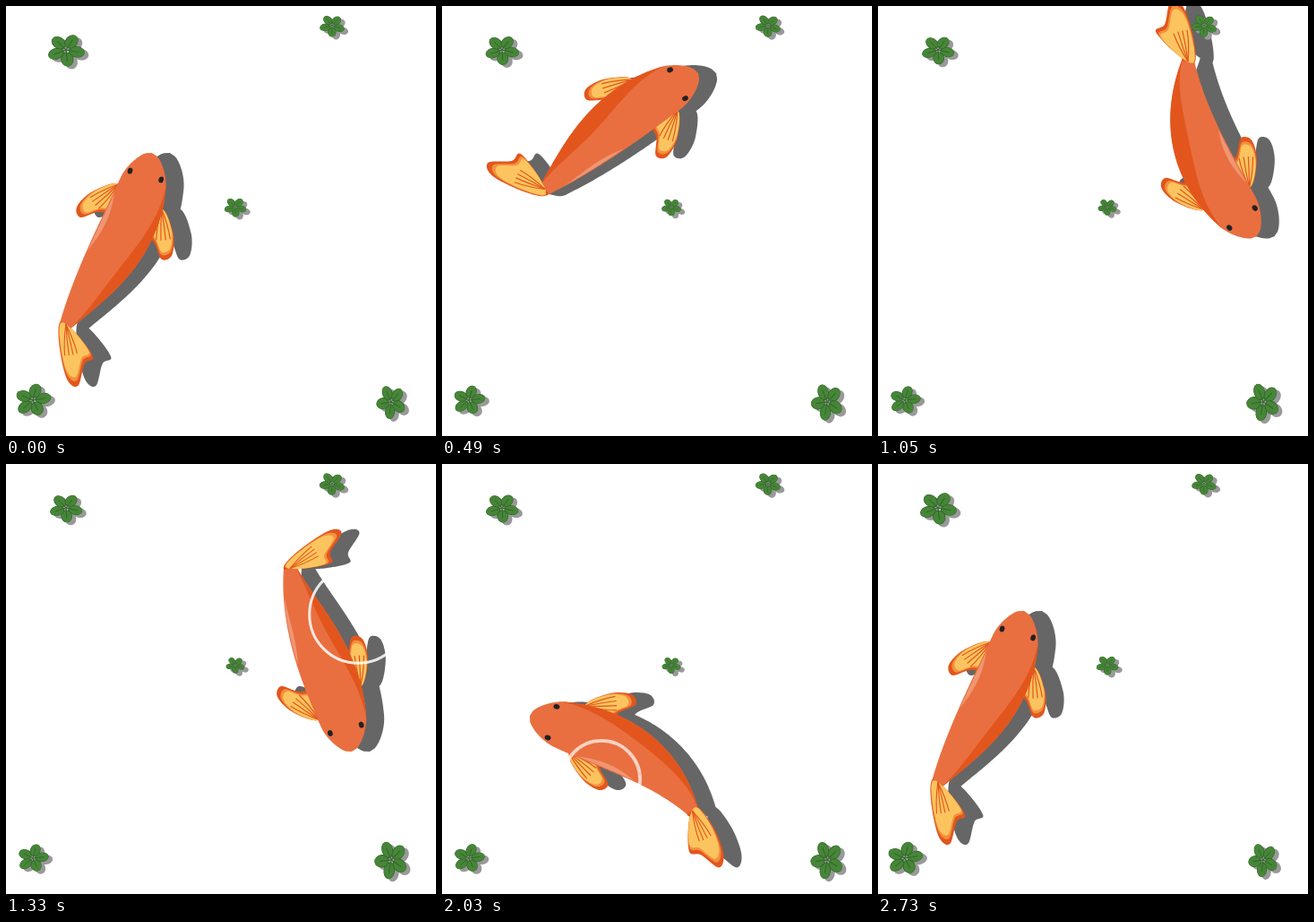
An HTML page with a canvas for the animation above (2800 ms loop, 480 by 480 pixels).

```html
<!DOCTYPE html>
<html lang="en">
<head>
<meta charset="utf-8">
<title>Koi and clovers</title>
<style>
  html, body { margin: 0; width: 100%; height: 100%; overflow: hidden; background: #fff; }
  canvas { display: block; width: 480px; height: 480px; }
</style>
</head>
<body>
<canvas id="pond" width="480" height="480"></canvas>
<script>
const ctx = document.getElementById('pond').getContext('2d');
const LOOP = 2800, STEP = 70, SWIM = 2730, WAG = SWIM / 3;
const TAU = Math.PI * 2, RAD = Math.PI / 180;
const LENGTH = 216, DS = 2, NECK = 45;
const C = {
  body: '#e96f40', dark: '#e2561d', light: '#ef9673', amber: '#f3903f',
  yellow: '#fcc45e', eye: '#222', shadow: '#666', leaf: '#478539', rim: '#2f6627'
};

// Route of the nose: time, x, y, direction from nose to tail in degrees
const ROUTE = [
  [0, 163, 164, 106], [490, 286, 75, 152], [770, 386, 178, 207], [1330, 386, 321, 255],
  [1750, 179, 403, 331], [2030, 98, 281, 376], [SWIM, 163, 164, 466]
];

// Outlines from root to tip
const FIN = [[0, 0], [28, 11], [52, 8], [56, -4], [37, -11], [20, -24]];
const TAIL = [[-3, -7], [25, -13], [60, -11], [70, 1], [47, 14], [41, 26], [10, 9]];

// x, y, start, duration, radius, rings
const DROPS = [
  [167, 95, 560, 440, 65, 3], [393, 168, 1050, 440, 57, 1], [178, 352, 1400, 600, 44, 2]
];

// x, y, width, turn, growth
const CLOVERS = [
  [67, 49, 42, 0, .88], [364, 22, 28, 8, 1.03], [256, 224.5, 25, 5, .84],
  [30, 440, 41, -20, .86], [430, 442, 38, 87, 1.12]
];

const clamp = (v, a, b) => Math.max(a, Math.min(b, v));
const mix = (a, b, u) => a + (b - a) * u;

// Smooth curve through one column of the route; both ends share a slope
function route(col, t) {
  const n = ROUTE.length - 1;
  const i = Math.max(0, ROUTE.findIndex(r => r[0] >= t) - 1);
  const span = j => ROUTE[j + 1][0] - ROUTE[j][0];
  const rate = j => (ROUTE[j + 1][col] - ROUTE[j][col]) / span(j);
  const slope = j => {
    const a = (j + n - 1) % n, b = j % n;
    return (rate(a) * span(b) + rate(b) * span(a)) / (span(a) + span(b));
  };
  const w = span(i), u = (t - ROUTE[i][0]) / w, v = 1 - u;
  return ROUTE[i][col] * v * v * (1 + 2 * u) + ROUTE[i + 1][col] * u * u * (1 + 2 * v)
    + w * u * v * (slope(i) * v - slope(i + 1) * u);
}

function girth(s) {
  const front = Math.max(0, 1 - s / 36);
  return 30.5 * Math.cos((s - 88) * .0104) * Math.sqrt(1 - front * front);
}

// A wave travels down the spine and drives fins, tail and shading
function pose(t) {
  const wave = lag => Math.cos(TAU * t / WAG - lag * RAD);
  const head = route(3, t), spine = [];
  let x = route(1, t), y = route(2, t);
  for (let s = 0; s <= LENGTH; s += DS) {
    const a = (head + Math.max(0, s - NECK) * (.03 + .22 * wave(s / 3))) * RAD;
    spine.push({ x, y, a, s });
    x += Math.cos(a) * DS;
    y += Math.sin(a) * DS;
  }
  return {
    spine,
    tail: (head + 18 + 57 * wave(141)) * RAD,
    spread: .65 + .35 * Math.abs(wave(45)),
    flip: clamp(5 * wave(-16), -1, 1),
    fins: [[1, 24.5 + 12.5 * wave(0)], [-1, 31 - 11 * wave(40)]],
    shade: .75 * wave(45) - .05,
    gloss: 125 - 35 * wave(30)
  };
}

// Positive offsets lie to the left of the heading
function beside(p, off) {
  return [p.x - Math.sin(p.a) * off, p.y + Math.cos(p.a) * off];
}

function fillPoly(points, color) {
  ctx.beginPath();
  points.forEach(p => ctx.lineTo(...p));
  ctx.closePath();
  ctx.fillStyle = color;
  ctx.fill();
}

function fillDot(x, y, rx, ry, turn, color) {
  ctx.beginPath();
  ctx.ellipse(x, y, rx, ry, turn, 0, TAU);
  ctx.fillStyle = color;
  ctx.fill();
}

function fillSmooth(points, color, k = 1) {
  const n = points.length, at = i => points[(i + n) % n];
  ctx.save();
  ctx.scale(k, k);
  ctx.beginPath();
  ctx.moveTo(...points[0]);
  for (let i = 0; i < n; i++) {
    const [a, b, c, d] = [at(i - 1), at(i), at(i + 1), at(i + 2)];
    ctx.bezierCurveTo(b[0] + (c[0] - a[0]) / 6, b[1] + (c[1] - a[1]) / 6,
      c[0] - (d[0] - b[0]) / 6, c[1] - (d[1] - b[1]) / 6, c[0], c[1]);
  }
  ctx.fillStyle = color;
  ctx.fill();
  ctx.restore();
}

function drawWeb(outline, flat) {
  fillSmooth(outline, flat || C.dark);
  if (flat) return;
  fillSmooth(outline, C.amber, .91);
  fillSmooth(outline, C.yellow, .85);
  ctx.strokeStyle = C.dark;
  ctx.lineWidth = 1.2;
  for (let a = -.24; a < .25; a += .15) {
    ctx.beginPath();
    ctx.moveTo(0, 0);
    ctx.quadraticCurveTo(18, 28 * a, 35 * Math.cos(a), 35 * Math.sin(a));
    ctx.stroke();
  }
}

function drawFin(fish, [side, angle], flat) {
  const p = fish.spine[Math.round((77 - angle * .9) / DS)];
  ctx.save();
  ctx.translate(...beside(p, side * (girth(p.s) - 1)));
  ctx.rotate(p.a + side * angle * RAD);
  ctx.scale(1, side);
  drawWeb(FIN, flat);
  ctx.restore();
}

// The long lobe swaps sides by blending the outline with its mirror image
function drawTail(fish, flat) {
  const m = (1 + fish.flip) / 2;
  const shape = TAIL.map(([x, y], i) => {
    const o = TAIL[TAIL.length - 1 - i];
    return [mix(o[0], x, m), mix(-o[1], y, m)];
  });
  const end = fish.spine[fish.spine.length - 1];
  ctx.save();
  ctx.translate(end.x, end.y);
  ctx.rotate(fish.tail);
  ctx.scale(1, -fish.spread);
  drawWeb(shape, flat);
  ctx.restore();
}

function drawBody(fish, flat) {
  const { spine, shade, gloss } = fish;
  const edge = (list, f) => list.map(p => beside(p, girth(p.s) * f(p.s)));
  const band = (list, outer, inner, color) =>
    fillPoly([...edge(list, outer), ...edge(list, inner).reverse()], color);

  const end = spine[spine.length - 1], r = girth(LENGTH);
  fillDot(end.x, end.y, r, r, 0, flat || C.dark);
  band(spine, () => 1, () => -1, flat || C.body);
  if (flat) return;

  const side = -Math.sign(shade), depth = Math.abs(shade);
  const bump = s => Math.sin(Math.PI * clamp((s - 27) / 195, 0, 1) ** 1.25);
  band(spine, () => side, s => side * (1 - depth * bump(s)), C.dark);

  const streak = spine.filter(p => Math.abs(p.s - gloss) < 38);
  const taper = s => .17 * (1 - ((s - gloss) / 38) ** 2);
  band(streak, () => -side * .96, s => -side * (.96 - taper(s)), C.light);

  const brow = spine[26 / DS];
  [-18, 18].forEach(off => fillDot(...beside(brow, off), 3.5, 2.8, brow.a, C.eye));
}

function drawFish(fish, flat) {
  fish.fins.forEach(f => drawFin(fish, f, flat));
  drawBody(fish, flat);
  drawTail(fish, flat);
}

function drawDrop([x, y, start, span, radius, rings], t) {
  ctx.strokeStyle = '#fff';
  ctx.lineWidth = 3 / Math.sqrt(rings);
  for (let i = 0; i < rings; i++) {
    const p = (t - start - i * 70) / span;
    const alpha = clamp((start + span * 1.25 - t) / 180, 0, .85);
    if (p <= 0 || !alpha) continue;
    ctx.globalAlpha = alpha;
    ctx.beginPath();
    ctx.arc(x, y, radius * (1 - .04 * i) * (1 - (1 - Math.min(1, p)) ** 3), 0, TAU);
    ctx.stroke();
  }
  ctx.globalAlpha = 1;
}

function drawLeaves(flat) {
  for (let i = 0; i < 5; i++) {
    ctx.save();
    ctx.rotate((12 + i * 72) * RAD);
    fillDot(11.5, 0, 8.8, 6.8, 0, flat || C.rim);
    if (!flat) {
      fillDot(11.8, 0, 8.2, 6.1, 0, C.leaf);
      ctx.strokeStyle = C.rim;
      ctx.lineWidth = 1;
      ctx.beginPath();
      ctx.moveTo(0, 0);
      ctx.lineTo(14, 0);
      ctx.stroke();
    }
    ctx.restore();
  }
}

function drawClover([x, y, width, turn, growth], open) {
  const size = width / 40 * mix(1, growth, open);
  const place = (dx, dy, flat) => {
    ctx.save();
    ctx.translate(x + dx, y + dy);
    ctx.rotate((turn + 3 * open) * RAD);
    ctx.scale(size, size * .87);
    drawLeaves(flat);
    ctx.restore();
  };
  place(4.5, 3, '#999');
  place(0, 0);
}

function render(t) {
  ctx.fillStyle = '#fff';
  ctx.fillRect(0, 0, 480, 480);
  const fish = pose(t);
  ctx.save();
  ctx.translate(20, 0);
  drawFish(fish, C.shadow);
  ctx.restore();
  drawFish(fish);
  DROPS.forEach(d => drawDrop(d, t));
  const open = 1 - ((1 + Math.cos(TAU * t / SWIM)) / 2) ** 4;
  CLOVERS.forEach(c => drawClover(c, open));
}

const begin = performance.now();
function tick() {
  const t = (performance.now() - begin) % LOOP;
  render(Math.floor(t / STEP) * STEP);
  requestAnimationFrame(tick);
}
tick();
</script>
</body>
</html>
```
